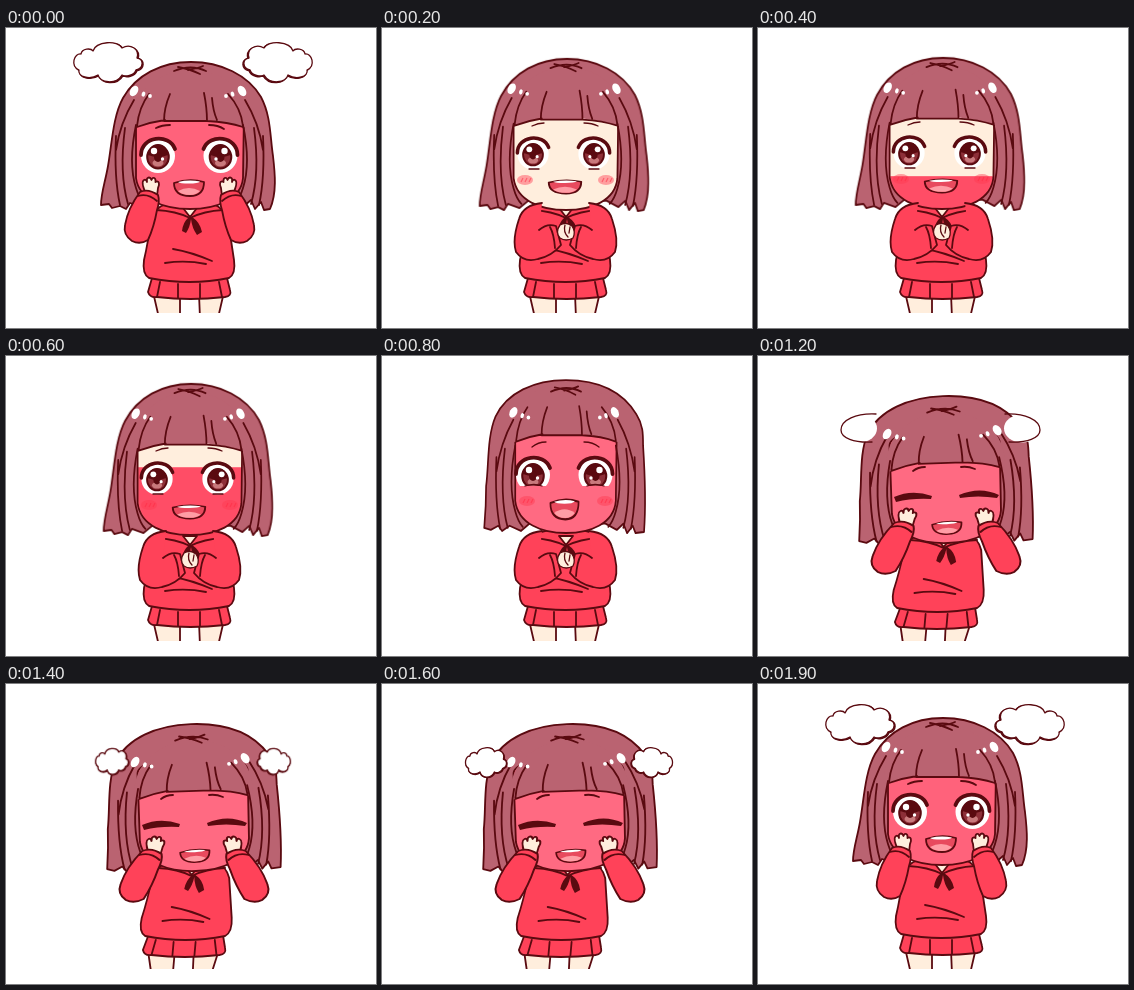
These frames come from a looping animation (370 px wide and 300 px high, 2 s). An HTML page without scripts:

```html
<!DOCTYPE html>
<html lang="en">
<head>
<meta charset="utf-8">
<title>Steaming blush</title>
<style>
  html, body { margin: 0; width: 100%; height: 100%; overflow: hidden; background: #fff; }
  svg { display: block; width: 100vw; height: 100vh; }
  :root { --ink: #5a0a10; --red: #ff4259; --hair: #ba6371; --skin: #ffeedd; }

  .ln { fill: none; stroke: var(--ink); stroke-width: 1.8; stroke-linecap: round; stroke-linejoin: round; }
  .red { fill: var(--red); }
  .hair { fill: var(--hair); }
  .skin { fill: var(--skin); }
  .ink { fill: var(--ink); }
  .white { fill: #fff; }
  .face { fill: currentColor; }
  .thin { stroke-width: 1.3; }
  .lash { stroke-width: 3.8; }
  .head { transform-origin: 184px 180px; }
  .blush { fill: #ff3a50; opacity: .75; }

  .pose, .bob, .level, .sway, .puff, .sliver { animation: 2s step-end infinite; }
  .pose, .sliver { visibility: hidden; }
  .shy { animation-name: shy; }
  .fill { animation-name: fill; }
  .joy { animation-name: joy; }
  .squeeze { animation-name: squeeze; }
  .burst { animation-name: burst; }
  @keyframes shy { 0%, 95% { visibility: visible } 5% { visibility: hidden } }
  @keyframes fill { 0%, 35% { visibility: hidden } 5% { visibility: visible } }
  @keyframes joy { 0%, 45% { visibility: hidden } 35% { visibility: visible } }
  @keyframes squeeze { 0%, 55% { visibility: hidden } 45% { visibility: visible } }
  @keyframes burst { 0%, 95% { visibility: hidden } 55% { visibility: visible } }

  .fill .bob { animation-name: bobFill; }
  .joy .bob { animation-name: bobJoy; }
  .squeeze .bob { animation-name: bobSqueeze; }
  @keyframes bobFill {
    0%, 5% { transform: translateY(2px) } 10% { transform: translateY(1px) }
    20% { transform: none } 25% { transform: translateY(-1px) } 30% { transform: translateY(-2px) }
  }
  @keyframes bobJoy { 0% { transform: translateY(2px) } 40% { transform: none } }
  @keyframes bobSqueeze { 0% { transform: translateY(-6px) } 50% { transform: none } }

  /* blush climbs 17px per step */
  .level { animation-name: level; }
  @keyframes level {
    0% { transform: translateY(51px) } 10% { transform: translateY(34px) } 15% { transform: translateY(17px) }
    20% { transform: none } 25% { transform: translateY(-17px) } 30% { transform: translateY(-34px) }
  }

  .sway { transform-origin: 185px 0; animation-name: sway; }
  @keyframes sway {
    0%, 60%, 70%, 80%, 90% { transform: none }
    55%, 65%, 75%, 85% { transform: scaleX(-1) }
  }

  .puff { animation-name: puff; }
  .sliver { animation-name: sliver; }
  @keyframes sliver { 0%, 70% { visibility: hidden } 60% { visibility: visible } }
  @keyframes puff {
    0% { visibility: visible; transform: translate(102px, 35px) }
    5% { visibility: hidden; transform: translate(102px, 35px) }
    70% { visibility: visible; transform: translate(106px, 78px) scale(.48, .66) }
    75% { visibility: visible; transform: translate(105px, 79px) scale(.54, .7) }
    80% { visibility: visible; transform: translate(104px, 79px) scale(.6, .75) }
    85% { visibility: visible; transform: translate(101px, 66px) scale(.8, .88) }
    90% { visibility: visible; transform: translate(99px, 53px) }
    95% { visibility: visible; transform: translate(102px, 41px) }
  }
</style>
</head>
<body>
<svg viewBox="0 0 370 300" preserveAspectRatio="none">
  <defs>
    <clipPath id="stage"><path d="M0 0H370V285H0Z"/></clipPath>
    <path id="faceShape" d="M130 82V150C133 172 158 181 184 181C210 181 235 172 237 150L238 82C238 60 130 60 130 82Z"/>
    <clipPath id="faceClip"><use href="#faceShape"/></clipPath>
    <clipPath id="lid"><path d="M-22-24H22V12H-22Z"/></clipPath>

    <path id="flaredHair" class="ln hair" d="M185 34C155 34 130 47 117 70C107 88 106 115 102 138C99 155 95 165 95 177L103 176L106 180L114 178L120 181L124 175L136 179L145 172H226L238 178L245 172L249 181L255 174L258 182L264 181C271 165 269 145 267 128C264 108 265 88 255 69C242 47 215 34 185 34Z"/>
    <path id="straightHair" class="ln hair" d="M184 34C150 34 121 46 109 69C100 88 102 115 99 136C99 155 98 165 97 176L104 178L112 174L116 179L124 174L136 179L145 172H226L238 178L245 172L249 181L255 174L258 181L267 180C269 155 268 125 266 97C266 85 266 77 259 67C243 43 216 34 184 34Z"/>
    <g id="sideLines" class="ln">
      <path d="M128 72Q114 95 110 122M110 108Q108 150 114 177M119 100Q113 145 122 176M130 97Q122 135 130 160Q133 170 138 175"/>
    </g>
    <g id="shine" class="white">
      <ellipse cx="128" cy="63" rx="3.8" ry="5.6" transform="rotate(32 128 63)"/>
      <ellipse cx="137.500" cy="66" rx="1.800" ry="2.600" transform="rotate(20 137 66)"/>
      <circle cx="144" cy="68" r="1.900"/>
    </g>
    <g id="fringe">
      <path class="hair" d="M126 100L131 99Q145 94 159 92V93H201V92Q222 94 237 99L242 100C246 60 215 42 184 42C155 42 124 62 126 100Z"/>
      <path class="ln" d="M131 99Q145 94 159 92M164 66Q158 80 158 93H201Q201 80 198 65M201 93Q222 94 237 99M143 66Q133 79 131 98M222 66Q235 80 237 98M206 70Q207 83 211 92"/>
    </g>
    <g id="sides">
      <use href="#sideLines"/>
      <use href="#sideLines" transform="translate(367) scale(-1 1)"/>
    </g>
    <g id="crown">
      <path class="ln" d="M168 43Q185 36 200 43M172 39Q184 41 194 46M182 42Q193 40 197 38"/>
      <use href="#shine"/>
      <use href="#shine" transform="translate(364) scale(-1 1)"/>
    </g>
    <g id="head">
      <use href="#flaredHair"/><use href="#faceShape" class="ln face"/>
      <use href="#fringe"/><use href="#sides"/><use href="#crown"/>
    </g>

    <g id="torso" class="ln">
      <path class="skin" d="M147 264L153 290H174V266ZM193 266L194 290H212L218 264Z"/>
      <path class="red" d="M146 250L142 264Q144 270 151 269Q184 273 219 269Q226 268 224 262L221 250Z"/>
      <path d="M154 254L151 269M172 256V270M194 256V270M213 254L216 269"/>
      <path class="red" d="M160 176Q148 180 145 192Q142 215 138 232Q136 246 143 250Q184 258 223 250Q230 246 228 232Q224 205 222 192Q218 180 207 176Q184 168 160 176Z"/>
      <path class="skin" d="M177 180L184 189L191 180Z"/>
      <path d="M150 182Q170 183 184 190Q198 183 217 182"/>
      <path d="M167 221Q185 224 206 233M159 235Q180 232 200 236"/>
    </g>
    <path id="strings" class="ink" d="M183 189Q177 194 176 203L180 205Q184 199 185 191Q186 200 191 207L196 204Q194 194 186 189Z"/>

    <g id="armUp" class="ln">
      <path class="skin" d="M140 166C136 157 136 153 138 152Q140 151 141 154C140 149 144 148 145.500 152C147 148 150 150 149.500 154C153 152 154 156 152 160L151 168Z"/>
      <path class="red" d="M134 164Q142 160 152 167Q154 173 151 182Q148 199 142 212Q134 217 126 213Q117 207 119 197Q122 180 134 164Z"/>
      <path d="M132 168Q142 165 151 173"/>
    </g>
    <g id="armFold" class="ln">
      <path class="red" d="M160 175Q141 177 137 191Q130 212 134 224Q142 235 156 231Q170 228 179 217L174 198Q165 195 157 202"/>
      <path d="M168 199Q172 206 173 220"/>
    </g>
    <g id="foldArms">
      <use href="#armFold"/>
      <use href="#armFold" transform="translate(367) scale(-1 1)"/>
    </g>
    <g id="clasp" class="ln thin">
      <path class="skin" d="M178 197Q184 193 190 198Q194 204 191 210Q184 214 178 210Q173 204 178 197Z"/>
      <path d="M183 197Q181 204 186 209M188 199L187 205"/>
    </g>
    <g id="fist" class="ln thin">
      <path class="skin" d="M171 194Q176 189 182 194Q185 201 181 206Q175 208 171 205Z"/>
      <path d="M175 193L177 198M180 198L176 201"/>
    </g>

    <g id="eye">
      <ellipse class="white" cy="1" rx="17" ry="17"/>
      <ellipse cy="2" rx="10.800" ry="11.500" fill="#8d2f38" stroke="#5a0a10" stroke-width="2"/>
      <path class="ink" d="M-10 0A10 11 0 0 1 10 0Q0 4-10 0Z"/>
      <ellipse cy="8" rx="5.500" ry="3.500" fill="#c9797c"/>
      <ellipse class="ink" cy="2" rx="4" ry="5"/>
      <circle class="white" cx="-4" cy="-4" r="3.200"/>
      <circle class="white" cx="4.500" cy="4" r="1.700"/>
      <path class="ln lash" d="M-17 0C-17-19 11-22 17-6"/>
    </g>
    <g id="cheek" class="blush">
      <ellipse rx="8" ry="5" opacity=".6"/>
      <path d="M-4 2L-2-2M0 2L2-2M4 2L6-2" stroke="#ff3048" stroke-width="1.200"/>
    </g>
    <g id="mouth">
      <path class="ln" style="fill:#e84a5e" d="M-15-4Q0-9 15-5C15 4 11 9 1 9C-10 9-15 4-15-4Z"/>
      <path class="white" d="M-11-5Q0-7.500 11-5.500Q9-3.500 0-3.500Q-9-3.500-11-5Z"/>
      <path fill="#ff9da5" d="M-11 4Q0-2 11 4Q7 8 1 8Q-7 8-11 4Z"/>
    </g>
    <path id="cloudShape" vector-effect="non-scaling-stroke" d="M-15-12C-12-22 10-23 14-15C22-20 32-14 29-5C36-4 36 5 28 7C26 13 17 14 14 12C8 22-8 20-10 12C-18 17-31 14-29 7C-38 3-34-10-27-9C-26-15-17-15-15-12Z"/>
    <g id="cloud">
      <use href="#cloudShape" class="ln ink thin" x="1" y=".8"/>
      <use href="#cloudShape" class="ln white thin"/>
    </g>
    <g id="wisp">
      <ellipse class="white" cx="101" cy="72.500" rx="18" ry="14"/>
      <path class="ln thin" d="M118 58C98 57 83 64 83 74C83 82 96 87 114 86"/>
    </g>
  </defs>

  <g clip-path="url(#stage)">
    <g class="pose shy">
      <use href="#torso"/>
      <use href="#strings"/>
      <use href="#head" color="#ff627b"/>
      <use href="#eye" x="152" y="127"/>
      <use href="#eye" transform="translate(214.500 127) scale(-1 1)"/>
      <path class="ln" d="M150 100Q156 97 164 97M203 97Q212 97 218 101"/>
      <use href="#mouth" x="183" y="159"/>
      <use href="#armUp"/>
      <use href="#armUp" transform="translate(367) scale(-1 1)"/>
    </g>

    <g class="pose fill">
      <use href="#torso"/>
      <use href="#strings"/>
      <g class="bob">
        <g class="head" transform="scale(.97 1.028)">
          <use href="#flaredHair"/>
          <use href="#faceShape" class="skin"/>
          <g clip-path="url(#faceClip)"><rect class="level" x="120" y="149" width="130" height="110" fill="#ff4d66"/></g>
          <use href="#faceShape" class="ln"/>
          <use href="#fringe"/><use href="#sides"/><use href="#crown"/>
        </g>
        <use href="#eye" transform="translate(151 124) scale(.92)"/>
        <use href="#eye" transform="translate(212 124) scale(-.92 .92)"/>
        <path class="ln thin" d="M147 140H157M207 140H217M150 97Q156 94 162 94M202 94Q210 94 216 97"/>
        <use href="#cheek" x="143" y="151"/>
        <use href="#cheek" x="224" y="151"/>
        <use href="#mouth" transform="translate(183 157) scale(1.080 .85)"/>
      </g>
      <use href="#foldArms"/>
      <use href="#clasp"/>
    </g>

    <g class="pose joy">
      <use href="#torso"/>
      <use href="#strings"/>
      <g class="bob">
        <g class="head" color="#ff6a82" transform="translate(0 -4) scale(.94 1.040)">
          <use href="#straightHair"/><use href="#faceShape" class="ln face"/>
          <use href="#fringe" y="-6"/><use href="#sides"/><use href="#crown" y="2"/>
        </g>
        <g clip-path="url(#lid)" transform="translate(151 118)"><use href="#eye"/></g>
        <g clip-path="url(#lid)" transform="translate(213.500 118) scale(-1 1)"><use href="#eye"/></g>
        <path class="ln thin" d="M143 130Q152 127 160 130M205 130Q213 127 222 130M150 91Q156 86 164 86M202 86Q211 86 217 91"/>
        <use href="#cheek" x="145" y="145"/>
        <use href="#cheek" x="223" y="145"/>
        <use href="#mouth" transform="translate(182.500 152) scale(.94 1.250)"/>
      </g>
      <use href="#foldArms"/>
      <use href="#clasp"/>
    </g>

    <g class="pose squeeze">
      <use href="#torso"/>
      <g class="bob">
        <use href="#head" class="head" color="#ff6c84" transform="translate(-1 7) scale(1.050 .99)"/>
        <path class="ink" d="M131 138Q150 130 169 138L168 141Q150 139 133 141ZM198 138Q217 130 235 137L234 141Q217 139 199 141Z"/>
        <path class="ln" d="M150 120Q154 122 159 123M199 123Q208 123 214 120M175 164Q183 168 191 164"/>
        <use href="#cheek" x="144" y="159"/>
        <use href="#cheek" x="223" y="159"/>
      </g>
      <use href="#foldArms" transform="translate(-8.300 -6) scale(1.045 1)"/>
      <use href="#fist"/>
      <use href="#fist" transform="translate(367) scale(-1 1)"/>
    </g>

    <g class="pose burst">
      <g class="sway">
        <g transform="translate(18 2) skewX(-5)">
          <use href="#torso"/>
          <use href="#strings" x="2"/>
        </g>
        <g class="head" color="#ff6a82" transform="translate(6 6) rotate(-2) scale(1.020 1)">
          <use href="#straightHair"/><use href="#faceShape" class="ln face"/>
          <use href="#fringe" y="8"/><use href="#sides"/><use href="#crown" y="7"/>
        </g>
        <path class="ink" d="M136 141Q154 133 174 140L173 143Q154 142 138 146ZM201 139Q222 130 241 139L239 142Q220 139 202 142Z"/>
        <path class="ln" d="M155 115Q160 111 167 111M203 111Q210 110 217 113"/>
        <use href="#mouth" transform="translate(189 171) rotate(-3) scale(.98 .8)"/>
        <g transform="translate(4.500 3)">
          <use href="#armUp" transform="translate(145) scale(1.100 1) translate(-123) skewX(-8)"/>
          <use href="#armUp" transform="translate(222) scale(-1.100 1) translate(-123) skewX(-8)"/>
        </g>
      </g>
    </g>

    <g>
      <g class="puff"><use href="#cloud"/></g>
      <g class="sliver"><use href="#wisp"/></g>
    </g>
    <g transform="translate(374) scale(-1 1)">
      <g class="puff"><use href="#cloud"/></g>
      <g class="sliver" transform="translate(9)"><use href="#wisp"/></g>
    </g>
  </g>
</svg>
</body>
</html>
```
